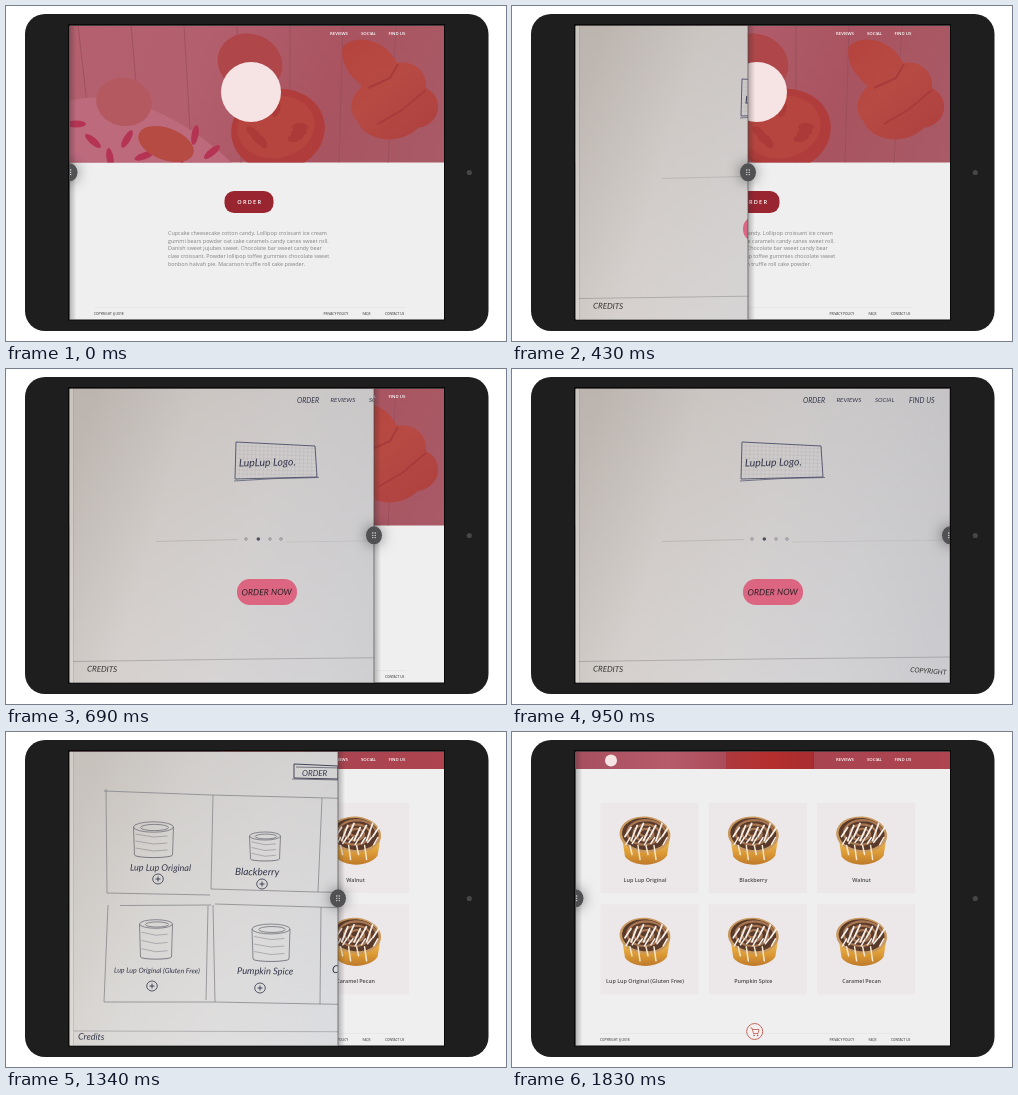
An HTML page with a canvas that plays this animation: 500x335 px, repeating every 2100 ms.

```html
<!DOCTYPE html>
<html lang="en">
<head>
<meta charset="utf-8">
<title>Sketch to page slider</title>
<style>
html, body { margin: 0; width: 100%; height: 100%; overflow: hidden; background: #fff; }
canvas { display: block; width: 100vw; height: 100vh; }
</style>
</head>
<body>
<canvas id="stage"></canvas>
<script>
const W = 500, H = 335, LOOP = 2100;
const LEFT = 63.4, TOP = 19.6, RIGHT = 438, BOTTOM = 313.4;
const UI = '"Open Sans", "Noto Sans", sans-serif';
const HAND = 'Lato, sans-serif';
const INK = '#34364a';

const canvas = document.getElementById('stage');
const ctx = canvas.getContext('2d');

// [start time, divider x]
const SLIDES = [
  [0, 63.5], [170, 106], [300, 167.5], [430, 236], [560, 304.5], [690, 368], [820, 416],
  [950, 438], [1080, 431], [1210, 395], [1340, 332], [1470, 258], [1570, 194], [1700, 120], [1830, 63.5]
];
const SECOND_PAGE = 1080, PAGE_READY = 1340;

const COPY = [
  'Cupcake cheesecake cotton candy. Lollipop croissant ice cream',
  'gummi bears powder oat cake caramels candy canes sweet roll.',
  'Danish sweet jujubes sweet. Chocolate bar sweet candy bear',
  'claw croissant. Powder lollipop toffee gummies chocolate sweet',
  'bonbon halvah pie. Macaroon truffle roll cake powder.'
];
const BUNS = ['Lup Lup Original', 'Blackberry', 'Walnut',
  'Lup Lup Original (Gluten Free)', 'Pumpkin Spice', 'Caramel Pecan'];

function rect(x, y, w, h, fill) {
  ctx.fillStyle = fill;
  ctx.fillRect(x, y, w, h);
}

function pill(x, y, w, h, r, fill) {
  ctx.beginPath();
  ctx.roundRect(x, y, w, h, r);
  ctx.fillStyle = fill;
  ctx.fill();
}

function oval(x, y, rx, ry, fill, turn = 0) {
  ctx.beginPath();
  ctx.ellipse(x, y, rx, ry, turn, 0, 7);
  ctx.fillStyle = fill;
  ctx.fill();
}

function line(points, color = INK, width = 0.7) {
  ctx.beginPath();
  points.forEach(([x, y], i) => i ? ctx.lineTo(x, y) : ctx.moveTo(x, y));
  ctx.strokeStyle = color;
  ctx.lineWidth = width;
  ctx.stroke();
}

function ring(x, y, rx, ry, color = INK, width = 0.7, from = 0, to = Math.PI * 2) {
  ctx.beginPath();
  ctx.ellipse(x, y, rx, ry, 0, from, to);
  ctx.strokeStyle = color;
  ctx.lineWidth = width;
  ctx.stroke();
}

function blend(x0, y0, x1, y1, ...colors) {
  const g = ctx.createLinearGradient(x0, y0, x1, y1);
  colors.forEach((c, i) => g.addColorStop(i / (colors.length - 1), c));
  return g;
}

function text(str, x, y, size, color, weight = 400, align = 'left', spacing = 0) {
  ctx.font = `${weight} ${size}px ${UI}`;
  ctx.letterSpacing = spacing + 'px';
  ctx.textAlign = align;
  ctx.fillStyle = color;
  ctx.fillText(str, x, y);
  ctx.letterSpacing = '0px';
}

function hand(str, x, y, size, turn = 0, color = INK) {
  ctx.save();
  ctx.translate(x, y);
  ctx.rotate(turn);
  ctx.font = `italic 400 ${size}px ${HAND}`;
  ctx.textAlign = 'left';
  ctx.fillStyle = color;
  ctx.fillText(str, 0, 0);
  ctx.restore();
}

function clipped(x, y, w, h, draw) {
  if (w <= 0) return;
  ctx.save();
  ctx.beginPath();
  ctx.rect(x, y, w, h);
  ctx.clip();
  draw();
  ctx.restore();
}

function nav() {
  text('REVIEWS', 324, 29.4, 4.3, '#fff', 600);
  text('SOCIAL', 355, 29.4, 4.3, '#fff', 600);
  text('FIND US', 382.5, 29.4, 4.3, '#fff', 600);
}

function footer() {
  rect(88, 301, 312, 0.5, '#dedede');
  text('COPYRIGHT @ 2018', 88, 309, 3.2, '#555', 600);
  text('PRIVACY POLICY', 317.5, 309, 3.2, '#555', 600);
  text('FAQS', 356.5, 309, 3.2, '#555', 600);
  text('CONTACT US', 379, 309, 3.2, '#555', 600);
}

function heroPhoto() {
  rect(LEFT, TOP, 376, 138, blend(LEFT, TOP, RIGHT, 156, '#b4606f', '#b45f6e', '#a95460', '#a85a66'));
  for (let i = 0; i < 7; i++) line([[72 + i * 53, TOP], [88 + i * 49, 157]], '#984e5c', 0.8);
  // patterned cloth
  ctx.beginPath();
  ctx.moveTo(LEFT, 95);
  ctx.bezierCurveTo(110, 82, 172, 106, 226, 157);
  ctx.lineTo(LEFT, 157);
  ctx.fillStyle = '#bd6a7d';
  ctx.fill();
  for (let i = 0; i < 9; i++) {
    oval(70 + i * 17, 118 + (i * 17) % 36, 10, 3.5, '#b53454', i * 0.7);
  }
  // pastries
  oval(118, 96, 28, 24, '#b4595f', 0.2);
  oval(160, 138, 29, 16, '#b54b43', 0.35);
  oval(244, 57, 33, 29, '#af474a', 0.4);
  oval(272, 124, 47, 41, '#b03d3b', -0.2);
  oval(270, 121, 39, 31, '#b5453e', -0.2);
  for (let i = 0; i < 8; i++) {
    oval(270 + 24 * Math.cos(i * 2.2), 121 + 18 * Math.sin(i * 2.2), 8, 4, '#ac3a38', i);
  }
  ctx.beginPath();
  ctx.moveTo(337, 40);
  ctx.bezierCurveTo(352, 27, 380, 34, 391, 57);
  ctx.bezierCurveTo(410, 54, 422, 68, 420, 82);
  ctx.bezierCurveTo(440, 92, 434, 119, 412, 122);
  ctx.bezierCurveTo(390, 142, 358, 133, 352, 116);
  ctx.bezierCurveTo(340, 104, 346, 89, 356, 80);
  ctx.bezierCurveTo(343, 70, 333, 55, 337, 40);
  ctx.fillStyle = blend(340, 30, 425, 130, '#b5433e', '#b74a43', '#ae403f');
  ctx.fill();
  line([[362, 82], [384, 72], [392, 58]], '#a83b3b', 2);
  line([[372, 118], [396, 104], [420, 84]], '#a83b3b', 2);
}

function hero() {
  clipped(LEFT, TOP, RIGHT - LEFT, 156.5 - TOP, heroPhoto);
  oval(245, 86, 30, 30, '#f6e3e4');
  nav();
}

function homePage() {
  rect(LEFT, TOP, 376, 296, '#efefef');
  hero();
  pill(218.5, 185, 49, 22, 9.5, '#992531');
  text('ORDER', 243.8, 198.1, 5.6, '#fff', 600, 'center', 1.25);
  COPY.forEach((row, i) => text(row, 162, 228.7 + i * 7.85, 5.45, '#828282'));
  footer();
}

function bun(x, y) {
  ctx.save();
  ctx.translate(x, y);
  ctx.beginPath();
  ctx.moveTo(-23, -3);
  ctx.lineTo(-20, 16);
  ctx.bezierCurveTo(-12, 27, 14, 27, 22, 15);
  ctx.lineTo(25, -3);
  ctx.fillStyle = blend(0, 0, 0, 25, '#edbb56', '#dc9a35', '#bd772a');
  ctx.fill();
  oval(0, -6, 25.5, 18, '#c9985e', 0.08);
  oval(0, -6.5, 23, 16, '#593a2b', 0.08);
  const swirl = [];
  for (let a = 0; a < 19; a += 0.25) {
    swirl.push([Math.cos(a) * (2 + a), -7 + Math.sin(a) * (1.3 + a * 0.7)]);
  }
  line(swirl, '#a87752', 2.2);
  ctx.lineCap = 'round';
  for (let i = 0; i < 7; i++) {
    const px = -20 + i * 6.2;
    line([[px, -4 + i % 2 * 4], [px + 6, -13 - i % 3 * 2]], '#f4eee8', 1.8);
    line([[px + 1, 4 - i % 3], [px + 5, -3]], '#f4eee8', 1.5);
  }
  for (let i = 0; i < 4; i++) line([[-15 + i * 8, 5], [-13 + i * 8, 14 + i % 2 * 5]], '#f3e6cd', 1.5);
  ctx.restore();
}

function cart() {
  oval(242.7, 299.5, 8.3, 8.3, '#f3f0f0');
  ring(242.7, 299.5, 8, 8, '#c1574f', 0.9);
  line([[238.5, 296], [240, 296], [241.5, 301.5], [246, 301.5], [247, 297.5], [240.5, 297.5]], '#c1574f', 0.8);
  oval(242, 303.4, 0.8, 0.8, '#c1574f');
  oval(245.6, 303.4, 0.8, 0.8, '#c1574f');
}

function menuPage(ready) {
  rect(LEFT, TOP, 376, 296, ready ? '#efefef' : '#fff');
  rect(LEFT, TOP, 376, 17.4, blend(LEFT, 0, RIGHT, 0, '#a84f5f', '#b55b6a', '#a6424f', '#a94450', '#ad444f'));
  rect(214, TOP, 87, 17.4, blend(214, 0, 301, 0, '#ac3a3e', '#b52e2e', '#a92d30'));
  rect(301, TOP, 1, 17.4, '#873442');
  oval(99, 28.5, 6, 6, '#f6e3e4');
  nav();
  if (!ready) return;
  BUNS.forEach((name, i) => {
    const x = 133 + i % 3 * 108.3, y = 71 + (i > 2 ? 101.3 : 0);
    rect(x - 44.5, y, 98, 90, '#ece8e9');
    bun(x, y + 37.5);
    text(name, x, y + 78.8, 5.4, '#484848', 600, 'center');
  });
  footer();
  cart();
}

function paper(...colors) {
  rect(LEFT, TOP, 376, 296, blend(LEFT, 110, RIGHT, 220, ...colors));
  rect(LEFT, TOP, 376, 296, blend(0, TOP, 0, BOTTOM, 'rgba(90,80,70,.07)', 'rgba(255,255,255,.06)'));
  rect(LEFT, TOP, 4, 296, 'rgba(235,230,224,.3)');
  rect(67, TOP, 0.8, 296, 'rgba(110,100,95,.25)');
}

function homeSketch() {
  paper('#c3bcb7', '#d3cecb', '#d4d1d1', '#d0cfd1', '#c9c8cc');
  hand('ORDER', 291, 33.5, 7, 0);
  hand('REVIEWS', 324.5, 33, 6.2);
  hand('SOCIAL', 363, 33, 6);
  hand('FIND US', 397, 33.5, 7);
  for (let i = 1; i < 20; i++) line([[230 + i * 4, 74 + i * 0.15], [229 + i * 4, 110]], 'rgba(90,95,130,.2)', 0.4);
  for (let i = 1; i < 9; i++) line([[230, 73 + i * 4], [310, 76 + i * 3.7]], 'rgba(90,95,130,.2)', 0.4);
  line([[230, 73], [309, 77], [311, 108], [229, 110], [230, 73]], '#4b4e69', 0.9);
  line([[228, 112], [270, 109.5], [313, 108.5]], '#4b4e69', 0.7);
  hand('LupLup Logo.', 233, 97.5, 10.5, -0.02);
  line([[150, 172.5], [232, 170.5]], 'rgba(80,80,90,.35)', 0.5);
  line([[280, 173], [RIGHT, 171]], 'rgba(80,80,90,.18)', 0.5);
  [240, 264, 275].forEach(x => ring(x, 170, 1.3, 1.3, '#777985', 0.7));
  oval(252.3, 170, 1.8, 1.8, '#505260');
  pill(231, 210, 60, 26, 12.5, '#dc6682');
  hand('ORDER NOW', 235.5, 226.4, 8.7, -0.01, '#2c2026');
  line([[67, 292.5], [250, 290], [RIGHT, 288]], 'rgba(85,82,85,.5)', 0.6);
  hand('CREDITS', 81, 302.5, 8, 0.02, '#333');
  hand('COPYRIGHT', 398, 303, 6.9, 0.08, '#333');
}

function can(x, y, w, h) {
  const r = w / 2, pencil = '#63636c', dip = w * 0.13;
  ring(x, y, r, dip, pencil);
  ring(x + 1, y + 0.5, r * 0.7, dip * 0.6, pencil);
  line([[x - r, y], [x - r + 1, y + h]], pencil);
  line([[x + r, y], [x + r - 1, y + h]], pencil);
  ring(x, y + h, r - 1, dip * 0.5, pencil, 0.8, 0, Math.PI);
  for (let i = 1; i < 4; i++) {
    line([[x - r + 2, y + h * i / 4], [x, y + h * i / 4 + 3], [x + r * 0.7, y + h * i / 4 + 2]], pencil, 0.4);
  }
}

function plus(x, y) {
  ring(x, y, 5.3, 5, INK, 0.8);
  line([[x - 2.5, y], [x + 2.5, y]], INK, 0.9);
  line([[x, y - 2.5], [x, y + 2.5]], INK, 0.9);
}

function menuSketch() {
  paper('#cfcac5', '#dad8d6', '#dddcdc', '#dadbde', '#d4d6da');
  const edge = '#7b7b82';
  line([[98, 59], [205, 63], [RIGHT, 69]], edge);
  line([[100, 57], [101, 161], [204, 163]], edge);
  line([[207, 63], [205, 157], [311, 160], [RIGHT, 162]], edge);
  line([[316, 66], [312, 160]], edge);
  line([[114, 173.5], [205, 173]], edge);
  line([[209, 172], [310, 175], [RIGHT, 179]], edge);
  line([[102, 173], [98, 270], [208, 270], [314, 272], [RIGHT, 274]], edge);
  line([[202, 174], [200, 268]], edge);
  line([[207, 173], [209, 270]], edge);
  line([[315, 175], [314, 272]], edge);

  can(147.5, 95, 40, 28);
  can(259, 104, 31, 23);
  can(361.5, 104, 33, 24);
  can(150, 192, 33, 33);
  can(265, 197, 38, 30);
  can(371, 197, 31, 29);

  hand(BUNS[0], 124, 138.5, 9, 0.01);
  hand(BUNS[1], 229, 143, 10, 0.01);
  hand(BUNS[2], 340, 144, 10.5);
  hand(BUNS[3], 108, 240.5, 7, 0.01);
  hand(BUNS[4], 231, 242, 9.3, 0.01);
  hand(BUNS[5], 326, 241, 10.8, 0.01);
  [[152, 147], [256, 152], [361.5, 155], [146, 254], [254, 256], [362, 258]].forEach(p => plus(...p));

  line([[288, 32], [332, 34], [332, 47], [288, 46], [288, 32]], INK, 0.9);
  line([[290, 35], [334, 36], [334, 48], [286, 47]], INK, 0.6);
  hand('ORDER', 296, 43.5, 8);
  hand('REVIEWS', 337, 45, 7.8);
  hand('SOCIAL', 379, 45.5, 7.2);
  line([[337, 47], [369, 48]], INK, 0.4);
  line([[68, 299], [RIGHT, 300]], 'rgba(85,85,95,.55)', 0.6);
  pill(379.5, 275, 34, 22, 1, '#d77d92');
  hand('CART', 383, 289.5, 9.5, 0, '#2b1a22');
  hand('Credits', 72, 307.5, 9, 0.02);
}

function divider(x) {
  rect(x, TOP, 7, 296, blend(x, 0, x + 7, 0, 'rgba(45,40,40,.3)', 'rgba(45,40,40,0)'));
  rect(x - 0.7, TOP, 1.2, 296, 'rgba(75,72,72,.5)');
  ctx.save();
  ctx.shadowColor = 'rgba(0,0,0,.5)';
  ctx.shadowBlur = 14;
  oval(x, 166.3, 8, 9, '#515153');
  ctx.restore();
  for (let i = 0; i < 6; i++) {
    oval(x - 1.2 + i % 2 * 2.4, 164 + (i >> 1) * 2.3, 0.65, 0.65, '#f2f2f2');
  }
}

function tablet() {
  rect(0, 0, W, H, '#fff');
  pill(19, 8, 463.5, 317, 20, '#1e1e1e');
  rect(62, 18, 377, 296.5, '#090909');
  oval(463.3, 166.5, 2.6, 2.6, '#464646');
}

function draw(time) {
  const x = SLIDES.findLast(([start]) => start <= time)[1];
  const second = time >= SECOND_PAGE;
  tablet();
  clipped(LEFT, TOP, RIGHT - LEFT, BOTTOM - TOP, () => {
    if (second) menuPage(time >= PAGE_READY);
    else homePage();
    clipped(LEFT, TOP, x - LEFT, BOTTOM - TOP, second ? menuSketch : homeSketch);
    divider(x);
  });
}

function resize() {
  const ratio = window.devicePixelRatio || 1;
  canvas.width = innerWidth * ratio;
  canvas.height = innerHeight * ratio;
}

let origin = null;
function tick(now) {
  origin ??= now;
  ctx.setTransform(canvas.width / W, 0, 0, canvas.height / H, 0, 0);
  draw((now - origin) % LOOP);
  requestAnimationFrame(tick);
}

resize();
addEventListener('resize', resize);
requestAnimationFrame(tick);
</script>
</body>
</html>
```
